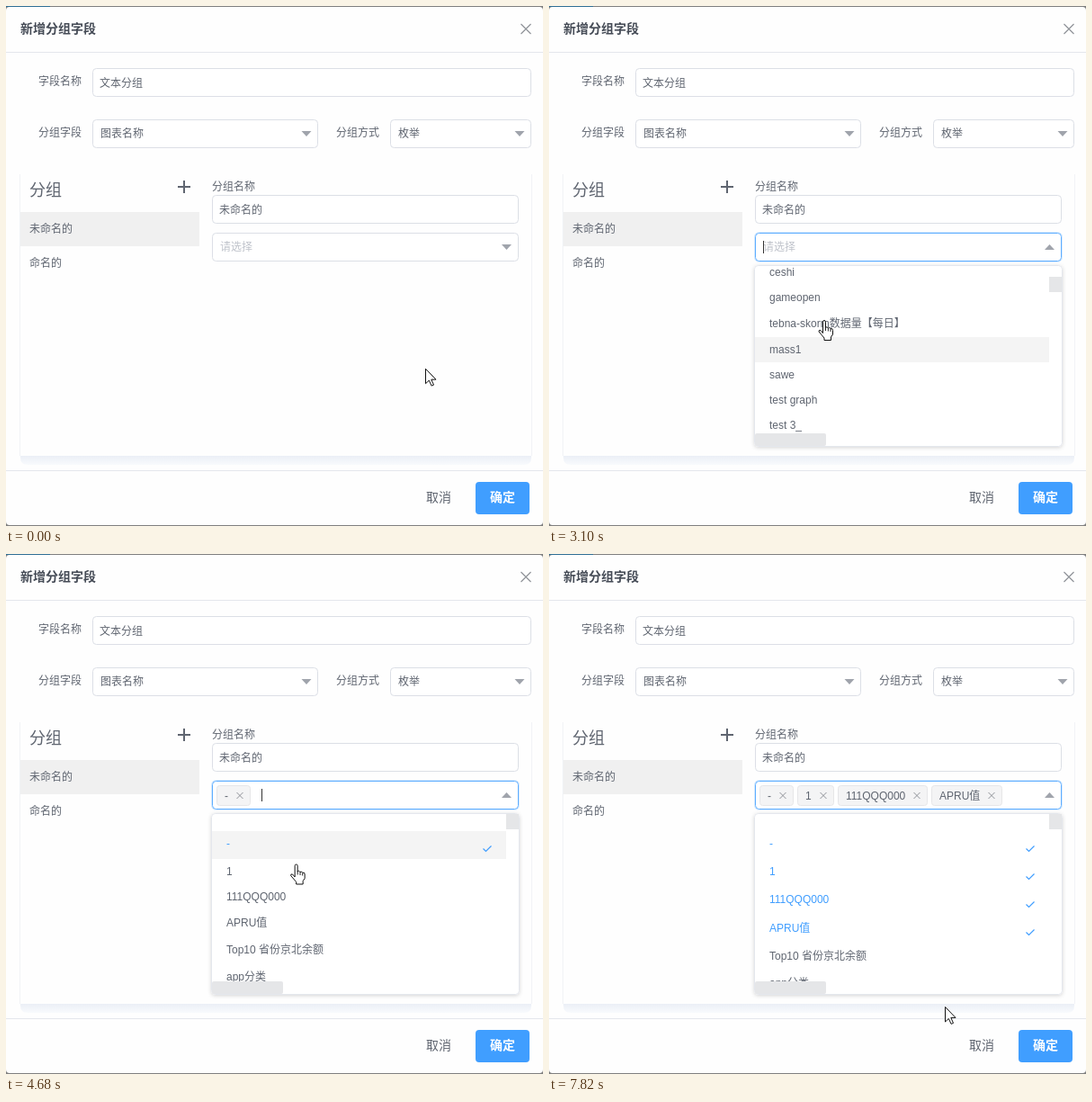
An HTML page that plays this animation: 597 by 578 pixels, repeating every 8000 ms.

```html
<!DOCTYPE html>
<html lang="zh-CN">
<head>
<meta charset="utf-8">
<style>
  html, body { margin: 0; width: 100%; height: 100%; overflow: hidden; background: #7f7f7f; }
  svg { display: block; width: 597px; height: 578px; }
  text { font-family: "Liberation Sans", "Noto Sans CJK SC", "Noto Sans CJK", sans-serif; white-space: pre; }
</style>
</head>
<body>
<svg viewBox="0 0 597 578">
  <defs>
    <linearGradient id="cardShadow" x2="0" y2="1">
      <stop stop-color="#ebeff6"/><stop offset="1" stop-color="#f8fafd"/>
    </linearGradient>
    <filter id="soft" x="-5%" y="-5%" width="110%" height="112%">
      <feDropShadow dx="0" dy="1" stdDeviation="2" flood-opacity=".16"/>
    </filter>
    <clipPath id="viewport"><rect x="229" y="289" width="327" height="186"/></clipPath>
  </defs>
  <g id="dialog"></g>
  <g id="live"></g>
</svg>
<script>
const LOOP = 8000, OPEN_AT = 1050, LEAVE_AT = 6600;
const BLUE = '#409eff', TEXT = '#5f6570', BORDER = '#dcdfe6', MUTED = '#c0c4cc';
const PANEL_TOP = 289, PANEL_HEIGHT = 201, LIST_TOP = 308;
const BLINK = 522, HOVER_LAG = 130;

const options = ['-', '1', '111QQQ000', 'APRU值', 'Top10 省份京北余额', 'app分类', 'ceshi', 'gameopen',
  'tebna-skorm数据量【每日】', 'mass1', 'sawe', 'test graph', 'test 3_', 'test 4'];

// The first four options are picked one after another at an even pace.
const clicks = options.slice(0, 4).map((_, i) => 4330 + 640 * i);

// Where the pointer arrives, and when
const stops = [
  { at: 0, x: 466, y: 403 },
  { at: 80, x: 466, y: 400 },
  { at: 790, x: 328, y: 271 },
  { at: 1680, x: 305, y: 369 },
  { at: 3100, x: 306, y: 349 },
  { at: 3750, x: 323, y: 334 },
  ...clicks.slice(1).map((click, i) => ({ at: click - 200, x: 322, y: 363.5 + 29.5 * i })),
  { at: 6770, x: 382, y: 452 },
  { at: 7300, x: 455, y: 536 },
  { at: 7820, x: 440, y: 503 },
];

const ARROW = 'M.5.5V17l3.8-3.6 2.8 6 2.4-1-2.7-6H12z';
const HAND = 'M-1.5 14.5V2.2Q-1.5.5 0 .5T1.5 2.2V8.5Q3 6.8 4.3 9 6 7.6 7 9.8 9.5 8.8 9.5 11.5V16' +
  'L7.5 19V22.5H0V20L-6 13Q-6.2 10.6-4 11.6z';

const progress = (t, from, to) => Math.min(1, Math.max(0, (t - from) / (to - from)));
const easeInOut = p => p * p * (3 - 2 * p);
const easeOut = p => 1 - (1 - p) ** 5;

const ruler = document.createElement('canvas').getContext('2d');
ruler.font = '12px "Liberation Sans", "Noto Sans CJK SC", "Noto Sans CJK", sans-serif';
const textWidth = str => ruler.measureText(str).width;

const label = (x, y, str, fill = TEXT, size = 12, extra = '') =>
  `<text x="${x}" y="${Math.round(y + size * .37)}" font-size="${size}" fill="${fill}" ${extra}>${str}</text>`;
const rect = (x, y, w, h, fill, extra = '') =>
  `<rect x="${x}" y="${y}" width="${w}" height="${h}" fill="${fill}" ${extra}/>`;
const field = (x, y, w, h = 32, stroke = BORDER, fill = '#fff', r = 4) =>
  rect(x + .5, y + .5, w - 1, h - 1, fill, `rx="${r}" stroke="${stroke}"`);
const line = (d, stroke, width = 1) =>
  `<path d="${d}" fill="none" stroke="${stroke}" stroke-width="${width}"/>`;
const triangle = (x, y, turn = 0) =>
  `<path d="M-5.5-3H5.5L0 3z" fill="#a0a4ac" transform="translate(${x} ${y}) rotate(${turn})"/>`;
const cross = (x, y, r, stroke, width) =>
  line(`M${x - r} ${y - r}l${2 * r} ${2 * r}m0 ${-2 * r}l${-2 * r} ${2 * r}`, stroke, width);

function drawDialog() {
  return rect(0, 0, 49, 1, '#2f6f95') +
    rect(0, 1, 597, 576, '#fefefe', 'rx="4"') +
    label(16, 25, '新增分组字段', '#454b56', 14, 'font-weight="700"') +
    cross(578, 25.5, 5.5, '#909399', 1.2) +
    rect(0, 51, 597, 1, '#e4e7ed') +
    label(36, 84, '字段名称') + field(96, 69, 488) + label(104, 86, '文本分组') +
    label(36, 141, '分组字段') + field(96, 126, 251) + label(105, 142, '图表名称') + triangle(334, 142) +
    label(367, 141, '分组方式') + field(427, 126, 157) + label(436, 142, '枚举') + triangle(571, 142) +
    rect(15, 187, 1, 313, '#f1f3f6') + rect(584, 187, 1, 313, '#f1f3f6') +
    '<path d="M16 500H584V502Q584 510 576 510H24Q16 510 16 502z" fill="url(#cardShadow)"/>' +
    label(26, 204, '分组', TEXT, 18) + line('M191 201H205M198 194V208', TEXT, 2) +
    rect(16, 229, 199, 38, '#f0f0f0') + label(26, 248, '未命名的') + label(26, 286, '命名的') +
    label(229, 201, '分组名称') + field(229, 210, 341) + label(237, 227, '未命名的') +
    rect(0, 516, 597, 1, '#e4e7ed') +
    label(467, 546, '取消', TEXT, 14) +
    rect(522, 529, 60, 36, BLUE, 'rx="4"') + label(538, 546, '确定', '#fff', 14, 'font-weight="700"');
}

// Longer ways take longer; each glide ends exactly at its stop's time.
function pointerAt(t) {
  let { x, y } = stops[0];
  stops.slice(1).forEach((stop, i) => {
    const distance = Math.hypot(stop.x - stops[i].x, stop.y - stops[i].y);
    const p = easeInOut(progress(t, stop.at - 90 - 2 * distance, stop.at));
    x += (stop.x - x) * p;
    y += (stop.y - y) * p;
  });
  return { x, y };
}

function scrollAt(t) {
  const down = easeInOut(progress(t, 1990, 2390));
  const up = easeInOut(progress(t, 3150, 3700));
  return 200 * (down - up);
}

function caretVisible(t, chosen) {
  const since = chosen ? clicks[chosen - 1] : OPEN_AT - BLINK / 2;
  return t >= OPEN_AT && (t - since) % (2 * BLINK) < BLINK;
}

function drawSelect(t, chosen, hovered) {
  const open = t >= OPEN_AT;
  let out = open ? rect(228.5, 251.5, 342, 33, 'none', 'rx="5" stroke="#409eff" stroke-opacity=".2"') : '';
  out += field(229, 252, 341, 32, open ? '#5dadff' : hovered ? MUTED : BORDER);
  let x = 234;
  for (const name of options.slice(0, chosen)) {
    const width = Math.round(textWidth(name) + 34);
    out += field(x, 257, width, 23, '#e6e6e8', '#f4f4f5', 3) + label(x + 9, 268.5, name) +
      cross(x + width - 12, 268.5, 3.5, '#909399', 1);
    x += width + 4;
  }
  if (!chosen) out += label(238, 268, '请选择', MUTED);
  if (caretVisible(t, chosen)) out += rect(chosen ? x + 8 : 238, 261, 1, 14, '#333');
  return out + triangle(556.5, 268, 180 * easeOut(progress(t, OPEN_AT, OPEN_AT + 300)));
}

function drawPanel(t, chosen) {
  const grow = easeOut(progress(t, OPEN_AT, OPEN_AT + 300));
  const scroll = scrollAt(t);
  const hover = pointerAt(t - HOVER_LAG); // highlight trails the pointer
  const canHover = t < LEAVE_AT && hover.x > 229 && hover.y > PANEL_TOP;
  let y = LIST_TOP - scroll, rows = '';
  options.forEach((name, i) => {
    const wide = /[^\x00-\x7f]/.test(name), selected = i < chosen;
    const height = selected ? 31 : wide ? 30 : 28;
    if (canHover && hover.y >= y && hover.y < y + height) rows += rect(229, y, 327, height, '#f4f4f4');
    rows += label(245, y + (wide ? 15 : 14), name, selected ? BLUE : TEXT);
    if (selected) rows += line(`M530.5 ${y + 19.5}l3 3 6-6`, BLUE, 1.2);
    y += height;
  });
  return `<g opacity="${grow}" transform="translate(0 ${PANEL_TOP * (1 - grow)}) scale(1 ${grow})">` +
    `<g filter="url(#soft)">${field(228, PANEL_TOP - 1, 343, PANEL_HEIGHT + 1, '#e4e7ed')}</g>` +
    `<g clip-path="url(#viewport)">${rows}</g>` +
    rect(556, PANEL_TOP + scroll * .06, 14, 17, '#e5e6e8') +
    rect(229, 475, 79, 14, '#e5e6e8', 'rx="2"') + '</g>';
}

function drawPointer({ x, y }, clickable) {
  const shape = `<path d="${clickable ? HAND : ARROW}" fill="#fff" stroke="#111" stroke-linejoin="round"/>`;
  const knuckles = clickable ? line('M1.5 8V12M4.4 9V12.5M7 10V13', '#111', .9) : '';
  return `<g transform="translate(${x} ${y})">${shape}${knuckles}</g>`;
}

function drawLive(t) {
  const pointer = pointerAt(t), { x, y } = pointer;
  const open = t >= OPEN_AT;
  const chosen = clicks.filter(click => t >= click).length;
  const clickable = x > 229 && x < 570 && y > 252 && y < (open ? 490 : 284);
  return drawSelect(t, chosen, clickable) + (open ? drawPanel(t, chosen) : '') + drawPointer(pointer, clickable);
}

document.getElementById('dialog').innerHTML = drawDialog();
const live = document.getElementById('live');
const start = performance.now();
function frame() {
  live.innerHTML = drawLive((performance.now() - start) % LOOP);
  requestAnimationFrame(frame);
}
frame();
</script>
</body>
</html>
```
